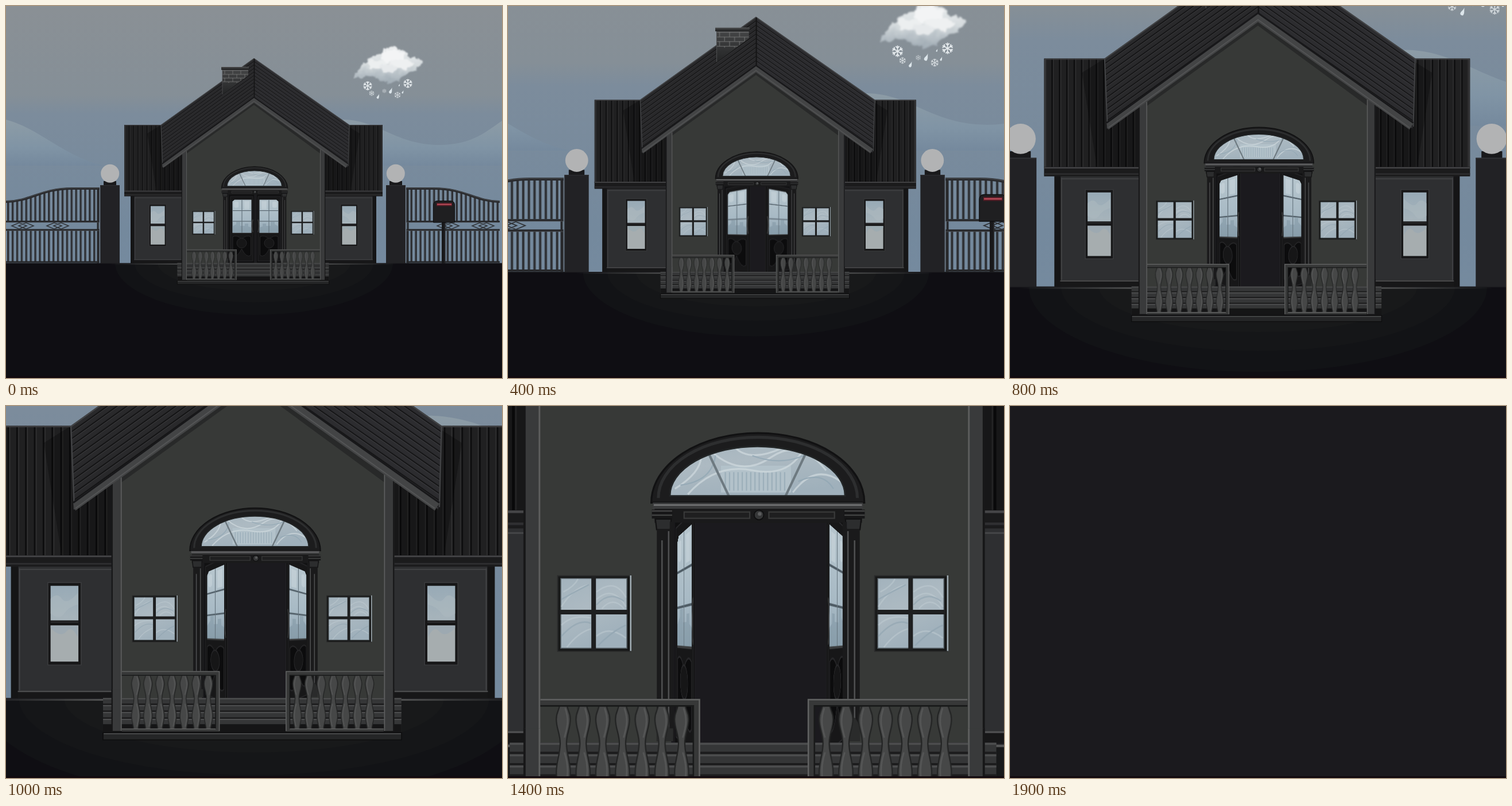
These frames come from a looping animation (864 px wide and 648 px high, 2.1 s). An HTML page without scripts:

```html
<!DOCTYPE html>
<html lang="en">
<head>
<meta charset="utf-8">
<title>House</title>
<style>
  @property --k { syntax: "<number>"; inherits: true; initial-value: 0; }
  html, body { margin: 0; width: 100%; height: 100%; overflow: hidden; background: #0f0e13; }
  .stage { position: relative; width: 864px; height: 648px; overflow: hidden; }
  /* --k counts 100 ms ticks */
  .world {
    position: absolute; inset: 0;
    animation: walk 2100ms infinite;
    transform-origin: 432px 385px;
    transform: scale(calc(1 / max(1 - .0492 * var(--k), .9205 - .0435 * var(--k))));
  }
  @keyframes walk {
    0% { --k: 0; animation-timing-function: steps(19, end); }
    90.4762%, 100% { --k: 19; }
  }
  .layer { position: absolute; left: 0; top: 0; width: 864px; height: 648px; }
  .leaf {
    --w: max(0, 1 - .0545 * var(--k));
    position: absolute; left: 388px; top: 328px; width: 45.5px; height: 120px;
    transform-origin: 0 62px;
    transform: scaleX(var(--flip, 1)) perspective(285px)
      rotateY(calc(-1 * acos(var(--w) * (1 - .158 * sin(acos(var(--w)))))));
  }
  .leaf svg { display: block; }
  .right { left: 481px; --flip: -1; }
  .edge { position: absolute; left: 0; bottom: 0; width: 100%; height: 3px; background: #12090e; }
</style>
</head>
<body>
<div class="stage">
<div class="world">

<svg class="layer" viewBox="0 0 864 648">
  <defs>
    <linearGradient id="sky" x2="0" y2="1">
      <stop offset="0" stop-color="#8a9095"/><stop offset=".24" stop-color="#858f97"/>
      <stop offset=".29" stop-color="#7c8c9c"/><stop offset=".6" stop-color="#74899d"/>
      <stop offset="1" stop-color="#788ea4"/>
    </linearGradient>
    <linearGradient id="hill" x2="0" y2="1">
      <stop offset="0" stop-color="#8d9ca6"/><stop offset=".6" stop-color="#8094a5"/>
      <stop offset="1" stop-color="#75899d"/>
    </linearGradient>
    <linearGradient id="cloud" x2="0" y2="1">
      <stop offset="0" stop-color="#eceeef"/><stop offset=".55" stop-color="#d3d9dc"/>
      <stop offset="1" stop-color="#a9b5be" stop-opacity=".75"/>
    </linearGradient>
    <linearGradient id="rim">
      <stop offset="0" stop-color="#555" stop-opacity="0"/><stop offset=".25" stop-color="#5a5b5b"/>
      <stop offset=".75" stop-color="#5a5b5b"/><stop offset="1" stop-color="#555" stop-opacity="0"/>
    </linearGradient>
    <linearGradient id="glass" x2=".4" y2="1">
      <stop offset="0" stop-color="#a3b3bd"/><stop offset=".5" stop-color="#adbac2"/>
      <stop offset="1" stop-color="#9fb0bb"/>
    </linearGradient>
    <linearGradient id="pane" x2="0" y2="1">
      <stop offset="0" stop-color="#98aab6"/><stop offset="1" stop-color="#a7b4bb"/>
    </linearGradient>
    <linearGradient id="doorGlass" x2="0" y2="1">
      <stop offset="0" stop-color="#b6c5cd"/><stop offset=".6" stop-color="#a8bac5"/>
      <stop offset="1" stop-color="#93a7b4"/>
    </linearGradient>
    <linearGradient id="stack" x2="0" y2="1">
      <stop offset="0" stop-color="#444546"/><stop offset="1" stop-color="#232425"/>
    </linearGradient>
    <pattern id="bars" width="7.9" height="10" patternUnits="userSpaceOnUse">
      <path d="M2 0h3.4v10h-3.4z" fill="#2d2f33"/>
      <path d="M5.2 0v10" stroke="#50555b" stroke-width=".6"/>
    </pattern>
    <pattern id="ribs" x="206" width="7.8" height="10" patternUnits="userSpaceOnUse">
      <path d="M0 0h7.8v10H0z" fill="#202021"/>
      <path d="M.8 0v10" stroke="#0d0d0e" stroke-width="1.6"/>
      <path d="M2.1 0v10" stroke="#333334" stroke-width=".8"/>
    </pattern>
    <pattern id="tilesL" width="10" height="6.2" patternUnits="userSpaceOnUse" patternTransform="translate(432 91) skewY(-35.6)">
      <path d="M0 0h10v6.2H0z" fill="#29292b"/>
      <path d="M0 5.6h10" stroke="#121213" stroke-width="1.2"/>
      <path d="M0 .4h10" stroke="#363638" stroke-width=".7"/>
    </pattern>
    <pattern id="tilesR" width="10" height="6.2" patternUnits="userSpaceOnUse" patternTransform="translate(432 91) skewY(34.9)">
      <path d="M0 0h10v6.2H0z" fill="#2c2c2f"/>
      <path d="M0 5.6h10" stroke="#141415" stroke-width="1.2"/>
      <path d="M0 .4h10" stroke="#38383b" stroke-width=".7"/>
    </pattern>
    <pattern id="bricks" x="377" y="112" width="14" height="13" patternUnits="userSpaceOnUse">
      <path d="M0 .5h14M0 7h14M4 0v7M11 7v6" fill="none" stroke="#757676" stroke-width=".8"/>
    </pattern>
    <pattern id="balusters" x="322.1" y="427" width="10.7" height="60" patternUnits="userSpaceOnUse">
      <g transform="translate(5.35)">
        <path d="M-2 0C-2 3-3.8 4-3.8 8C-3.8 13-1.7 16-1.7 21C-1.7 27-3.8 31-3.8 37C-3.8 42-2 44-2 49H2C2 44 3.8 42 3.8 37C3.8 31 1.7 27 1.7 21C1.7 16 3.8 13 3.8 8C3.8 4 2 3 2 0Z" fill="#464747" stroke="#222323" stroke-width=".7"/>
        <path d="M1 2C3 8 2.6 11 .6 18M.6 26C2.8 33 2.8 38 1 46" fill="none" stroke="#565757" stroke-width=".8"/>
      </g>
    </pattern>
    <filter id="fluff" x="-20%" y="-30%" width="140%" height="160%">
      <feTurbulence type="fractalNoise" baseFrequency=".1" numOctaves="4" seed="5"/>
      <feDisplacementMap in="SourceGraphic" scale="12" xChannelSelector="R" yChannelSelector="G"/>
      <feGaussianBlur stdDeviation="1.2"/>
    </filter>
    <g id="flake" fill="none" stroke="#e6ebee" stroke-width="1.4">
      <path id="arm" d="M0-8V8M-2.6-7L0-4.4L2.6-7M-2.6 7L0 4.4L2.6 7"/>
      <use href="#arm" transform="rotate(60)"/><use href="#arm" transform="rotate(120)"/>
    </g>
    <path id="drop" d="M2.5-6C2-1 3 1 1 4A2.6 2.6 0 0 1-3 2C-2.5-1 1-2 2.5-6Z" fill="#dce5ea"/>

    <g id="gate">
      <path d="M0 341C45 340 60 318 115 318H163V374H0Z" fill="url(#bars)"/>
      <path d="M0 391H163V447H0Z" fill="url(#bars)"/>
      <path d="M0 341C45 340 60 318 115 318H163" fill="none" stroke="#292a2d" stroke-width="4"/>
      <path d="M0 340C45 339 60 317 115 317H163" fill="none" stroke="#55595e" stroke-width=".7"/>
      <path d="M0 375.5H163M0 390H163M0 446H163M160 318V448" stroke="#27282b" stroke-width="3"/>
      <path d="M0 377H163M0 391.5H163M162.5 320V446" stroke="#55595e" stroke-width=".6"/>
      <g fill="none" stroke="#303337" stroke-width="1.5">
        <path id="dia" d="M10 383L23 377.5L36 383L23 388.5ZM22 383L35 377.5L48 383L35 388.5Z"/>
        <use href="#dia" x="61"/>
      </g>
      <path d="M164 312h34v136h-34z" fill="#222225"/>
      <path d="M164.5 312v136M164 312.5h34" stroke="#2f2f32"/>
      <path d="M170 305h22v7h-22z" fill="#19191b"/>
      <circle cx="181.2" cy="291.8" r="16" fill="#b2b3b4"/>
    </g>

    <g id="wing">
      <path d="M217 331h89v117h-89z" fill="#2e2f31"/>
      <path d="M217 331h6.5v117H217z" fill="#151516"/>
      <path d="M224.5 333v108M225 334H306" stroke="#454648" stroke-width=".9"/>
      <path d="M223 442H306" stroke="#505152"/>
      <path d="M223 442.6h83v5.4h-83z" fill="#171718"/>
      <path d="M206 207h100v116H206z" fill="url(#ribs)"/>
      <path d="M270 207L246 222L262 323H306V207Z" opacity=".28"/>
      <path d="M207 322V207.6H272" fill="none" stroke="#3b3b3d" stroke-width="1.2"/>
      <path d="M206 321.5h100v10H206z" fill="#1b1b1c"/>
      <path d="M206 322.5H306" stroke="#454547" stroke-width="1.4"/>
      <path d="M206 329H306" stroke="#2f2f31" stroke-width="1.4"/>
      <path d="M249.6 345.6h29.4v73h-29.4z" fill="#171718" stroke="#3d3e40" stroke-width=".7"/>
      <path d="M252 348.5h24.6v30.6H252z" fill="url(#pane)"/>
      <path d="M252 383.6h24.6v32H252z" fill="#a6adaf"/>
      <path d="M252 360q6-6 10 0t14-5v10q-8 2-12 8t-12 0z" fill="#aebac0" opacity=".55"/>
      <path d="M252 386q9 9 14 3t10 5v-10.4H252z" fill="#9aa9b2" opacity=".7"/>
      <path d="M252 380.6h24.6" stroke="#39393b" stroke-width=".7"/>
    </g>

    <g id="win">
      <path d="M325 357.2h39.5v41H325z" fill="#171818" stroke="#2a2b2b" stroke-width=".6"/>
      <path d="M326.7 358.7h35.8v37.8h-35.8z" fill="url(#glass)" stroke="#5c666c" stroke-width=".5"/>
      <g fill="none" stroke-width=".8" opacity=".5">
        <path d="M327 374Q333 364 342 362M328 366Q334 363 336 359M346 366Q356 358 362 369M346 370Q355 362 362 374M349 375Q355 368 361 375M327 384Q333 378 343 380M330 396Q336 388 343 386M346 390Q353 384 362 391" stroke="#c1cdd3"/>
        <path d="M327 370Q334 366 342 362M346 373Q353 365 361 371M327 390Q336 380 343 383M347 395Q355 387 362 384" stroke="#8ca1ae"/>
      </g>
      <path d="M344.5 357.5v40M326 376.9h37.5" stroke="#1e1f20" stroke-width="2.5"/>
      <path d="M364.6 357v41" stroke="#9fabb2" stroke-width=".8"/>
    </g>

    <g id="rail">
      <path d="M322.1 427h74.9v49h-74.9z" fill="url(#balusters)"/>
      <path d="M315 424h86.7v3.6H315zM398 424h3.7v53H398zM315 475h86.7v2.4H315z" fill="#373838"/>
      <path d="M315 424.4h86.7M401.3 424v53M315 475.2h83" stroke="#606161" stroke-width=".8"/>
      <path d="M315 427.8h83v47" fill="none" stroke="#191a1a" stroke-width=".8"/>
    </g>

    <g id="corner">
      <path d="M306.3 222h8.5v255h-8.5z" fill="#393a3b"/>
      <path d="M306.4 222v255" stroke="#171718" stroke-width="1.2"/>
      <path d="M314.5 222v255" stroke="#5d5e5e" stroke-width=".9"/>
    </g>

    <g id="column">
      <path d="M375.5 321.3h11.2v4.8h-11.2z" fill="#171718"/>
      <path d="M375.5 322h11M375.5 324.3h11" stroke="#434444" stroke-width=".7"/>
      <path d="M377.4 326.4h8.6l-.5 5.8h-7.4z" fill="#2c2d2e" stroke="#121213" stroke-width=".7"/>
      <path d="M378.2 332h7v115h-7zM385.2 328h2.3v119h-2.3z" fill="#1a1a1b"/>
      <path d="M381 338v108M384.6 333v113" stroke="#4e4f50" stroke-width=".8"/>
      <path d="M378 447V440Q382 428 385 440H387V447Z" fill="#2a2b2b"/>
    </g>
  </defs>

  <path d="M0 0h864v648H0z" fill="url(#sky)"/>
  <path d="M0 198C60 214 100 262 170 278H470C510 250 550 196 590 198C650 200 680 242 755 242C810 242 835 220 864 200V278H0Z" fill="url(#hill)"/>

  <g filter="url(#fluff)">
    <path d="M606 123C612 108 618 100 630 97C634 88 645 82 655 84C660 72 674 66 684 75C694 76 700 80 702 88C712 88 722 94 724 101C718 112 708 116 700 116C692 124 680 134 668 133C655 134 645 124 636 124C625 120 615 127 606 123Z" fill="url(#cloud)"/>
    <ellipse cx="674" cy="88" rx="21" ry="12" fill="#f3f4f5"/>
    <ellipse cx="648" cy="101" rx="17" ry="8" fill="#eceff0"/>
    <ellipse cx="690" cy="101" rx="20" ry="8" fill="#eef0f1"/>
    <ellipse cx="668" cy="108" rx="17" ry="7" fill="#e6e9eb"/>
  </g>
  <use href="#flake" transform="translate(630 139)"/>
  <use href="#flake" transform="translate(700 135)"/>
  <use href="#flake" transform="translate(637 152) scale(.58)" opacity=".8"/>
  <use href="#flake" transform="translate(659 148) scale(.46)" opacity=".6"/>
  <use href="#flake" transform="translate(682 155) scale(.7)" opacity=".8"/>
  <use href="#drop" transform="translate(670 148)"/>
  <use href="#drop" transform="translate(648 158) scale(.8)"/>
  <use href="#drop" transform="translate(685 138) scale(.4)"/>
  <use href="#drop" transform="translate(691 150) scale(.55)"/>

  <use href="#gate"/>
  <use href="#gate" transform="translate(860) scale(-1 1)"/>

  <path d="M759 377h6.500v71h-6.500z" fill="#18181a"/>
  <path d="M764.6 378v70" stroke="#3a3a3d" stroke-width=".7"/>
  <path d="M744.5 377V346Q745 340 751 339.5H775Q781 340 781.5 346V377Z" fill="#1f1f21" stroke="#0d0d0e"/>
  <path d="M750 343h27v5.5h-27z" fill="#551c25"/>
  <path d="M751 344.500h25v2.200h-25z" fill="#b54b58"/>

  <path d="M0 448h864v200H0z" fill="#0f0e13"/>
  <clipPath id="earth"><path d="M0 448h864v200H0z"/></clipPath>
  <g clip-path="url(#earth)">
    <ellipse cx="432" cy="448" rx="242" ry="90" fill="#121316"/>
    <ellipse cx="432" cy="448" rx="208" ry="68" fill="#151618"/>
    <ellipse cx="432" cy="448" rx="168" ry="48" fill="#18191a"/>
  </g>
  <path d="M0 448.2h864" stroke="#1d1d20"/>
  <path d="M180 448.800h500v1.400h-500z" fill="url(#rim)"/>

  <use href="#wing"/>
  <use href="#wing" transform="translate(862) scale(-1 1)"/>

  <path d="M306 448V254L432 160L556 254V448Z" fill="#373937"/>
  <path d="M306 259L432 168L556 259" fill="none" stroke="#282929" stroke-width="7"/>

  <use href="#corner"/>
  <use href="#corner" transform="translate(862) scale(-1 1)"/>
  <path d="M432 91L270 207L273 281L432 165Z" fill="url(#tilesL)"/>
  <path d="M432 91L598 207L595 281L432 165Z" fill="url(#tilesR)"/>
  <path d="M273 281L270 207.5L432 91.5L598 207.5L596 279" fill="none" stroke="#414244" stroke-width="1.3"/>
  <path d="M432.5 92V163" stroke="#141415" stroke-width="1.6"/>
  <path d="M272 275.5L432 159.5L596 275.5L592 282L432 168.5L274 282Z" fill="#434445"/>
  <path d="M272 275L432 159L596 275" fill="none" stroke="#18181a" stroke-width="1.6"/>
  <path d="M274 280L432 166L592 280" fill="none" stroke="#545556"/>

  <path d="M377 111H422V121L377 154.5Z" fill="url(#stack)"/>
  <path d="M377 112H422V121L404 134H377Z" fill="url(#bricks)"/>
  <path d="M377 111V154" stroke="#4c4d4e" stroke-width=".9"/>
  <path d="M375 106h48v5h-48z" fill="#333435"/>
  <path d="M375 106.5h48" stroke="#5a5b5c"/>
  <path d="M375 110.7h48" stroke="#19191a"/>

  <use href="#win" x="-.6"/>
  <use href="#win" x="171.4"/>
  <path d="M386 325h96v123h-96z" fill="#1b1a1e"/>
</svg>

<div class="leaf">
  <svg width="45.5" height="120" viewBox="0 0 45.5 120">
    <g id="leaf">
      <path d="M0 0h45.5v120H0z" fill="#111112"/>
      <path d="M3 4h39v112H3z" fill="#171718" stroke="#29292b" stroke-width=".8"/>
      <path d="M6.500 12.500L10 9.500H39.500V67H6.500Z" fill="url(#doorGlass)"/>
      <path d="M6.500 56l6.500-4v-4h7v7h8v-4h6v5l5.500 2v9h-33z" fill="#7b909e" opacity=".45"/>
      <path d="M9 14q5-3 8 0v8q-4 3-8 0zM27 12h9v14h-9z" fill="#d3dde2" opacity=".4"/>
      <path d="M6.500 28.500h33M6.500 47h33" stroke="#4e5b64" stroke-width="1.2"/>
      <path d="M23 9.500V67" stroke="#65747e" stroke-width="1.2"/>
      <path d="M6.500 67.500h33" stroke="#3b3c3d" stroke-width="1.2"/>
      <g fill="#0c0c0d" stroke="#262628">
        <path d="M7 74Q14 70 22.500 78Q31 70 38.500 74V106Q31 112 22.500 95Q14 112 7 106Z"/>
        <circle cx="22.500" cy="85" r="8.500" fill="#161617"/>
      </g>
      <path d="M42 44q-3 11 0 22" fill="none" stroke="#3c3d3e" stroke-width="1.6"/>
      <path d="M45 0v120" stroke="#252527"/>
    </g>
  </svg>
</div>
<div class="leaf right">
  <svg width="45.5" height="120" viewBox="0 0 45.5 120"><use href="#leaf"/></svg>
</div>

<svg class="layer" viewBox="0 0 864 648">
  <path d="M375.2 317.500A57.800 37.800 0 0 1 490.800 317.500Z" fill="#1c1c1d" stroke="#111112"/>
  <path d="M379 315A54 33 0 0 1 487 315" fill="none" stroke="#2d2e2f" stroke-width="1.6"/>
  <clipPath id="fan"><path d="M385.300 313.800A47.500 26.800 0 0 1 480.300 313.800Z"/></clipPath>
  <g clip-path="url(#fan)" fill="none">
    <path d="M380 280h106v36H380z" fill="url(#glass)"/>
    <path d="M413 297.500h38v14.500h-38z" fill="#b3c2ca"/>
    <path d="M415 306h34" stroke="#9cafba" stroke-width="10" stroke-dasharray=".7 1.6"/>
    <g opacity=".7">
      <path d="M388 310Q404 300 402 290M395 313Q410 296 430 300T458 288M408 290Q424 304 440 293T470 300M452 312Q464 296 478 306M420 287Q428 296 446 288" stroke="#d0dade"/>
      <path d="M391 308Q408 306 410 292M455 306Q468 300 474 310M430 292Q446 298 460 291" stroke="#8fa6b3" stroke-width=".7"/>
    </g>
    <path d="M406.400 291L417.300 314M458.900 291L448 314" stroke="#6e7a81" stroke-width="1.300"/>
  </g>
  <path d="M385.300 313.800A47.500 26.800 0 0 1 480.300 313.800Z" fill="none" stroke="#232627" stroke-width=".8"/>

  <path d="M376 317.500h114v3.500h-114z" fill="#3a3b3c"/>
  <path d="M376.500 318.800h113" stroke="#6c6d6e" stroke-width=".9"/>
  <path d="M377 320.800h112.500v7.600H377z" fill="#1a1a1b"/>
  <path d="M393 322.600h35.600v3.400h-35.600zM439 322.600h35.600v3.400h-35.600z" fill="#1f1f20" stroke="#383939" stroke-width=".7"/>
  <circle cx="433.600" cy="324.200" r="2.600" fill="#353637" stroke="#0f0f10" stroke-width=".6"/>
  <circle cx="434" cy="323.600" r="1" fill="#5c5d5e"/>
  <use href="#column"/>
  <use href="#column" transform="translate(866.500) scale(-1 1)"/>

  <path d="M298.400 447.700h264v31h-264z" fill="#353637"/>
  <path d="M298.400 448.400h264M298.400 454.600h264M298.400 460.700h264M298.400 466.800h264" stroke="#4c4d4e" stroke-width="1.1"/>
  <path d="M298.400 453.300h264M298.400 459.400h264M298.400 465.500h264" stroke="#1c1c1d" stroke-width="1.2"/>
  <path d="M298.400 471h264v7.500h-264z" fill="#151516"/>
  <path d="M298.400 478.500h264.200v6.300H298.400z" fill="#252627" stroke="#0e0e0f" stroke-width=".8"/>
  <path d="M299 479.400h263" stroke="#4b4c4d" stroke-width=".9"/>
  <clipPath id="foot"><path d="M298 440h266v37H298z"/></clipPath>
  <g clip-path="url(#foot)">
    <use href="#corner"/>
    <use href="#corner" transform="translate(862) scale(-1 1)"/>
  </g>
  <use href="#rail"/>
  <use href="#rail" transform="translate(861.700) scale(-1 1)"/>
</svg>

</div>
<div class="edge"></div>
</div>
</body>
</html>
```
